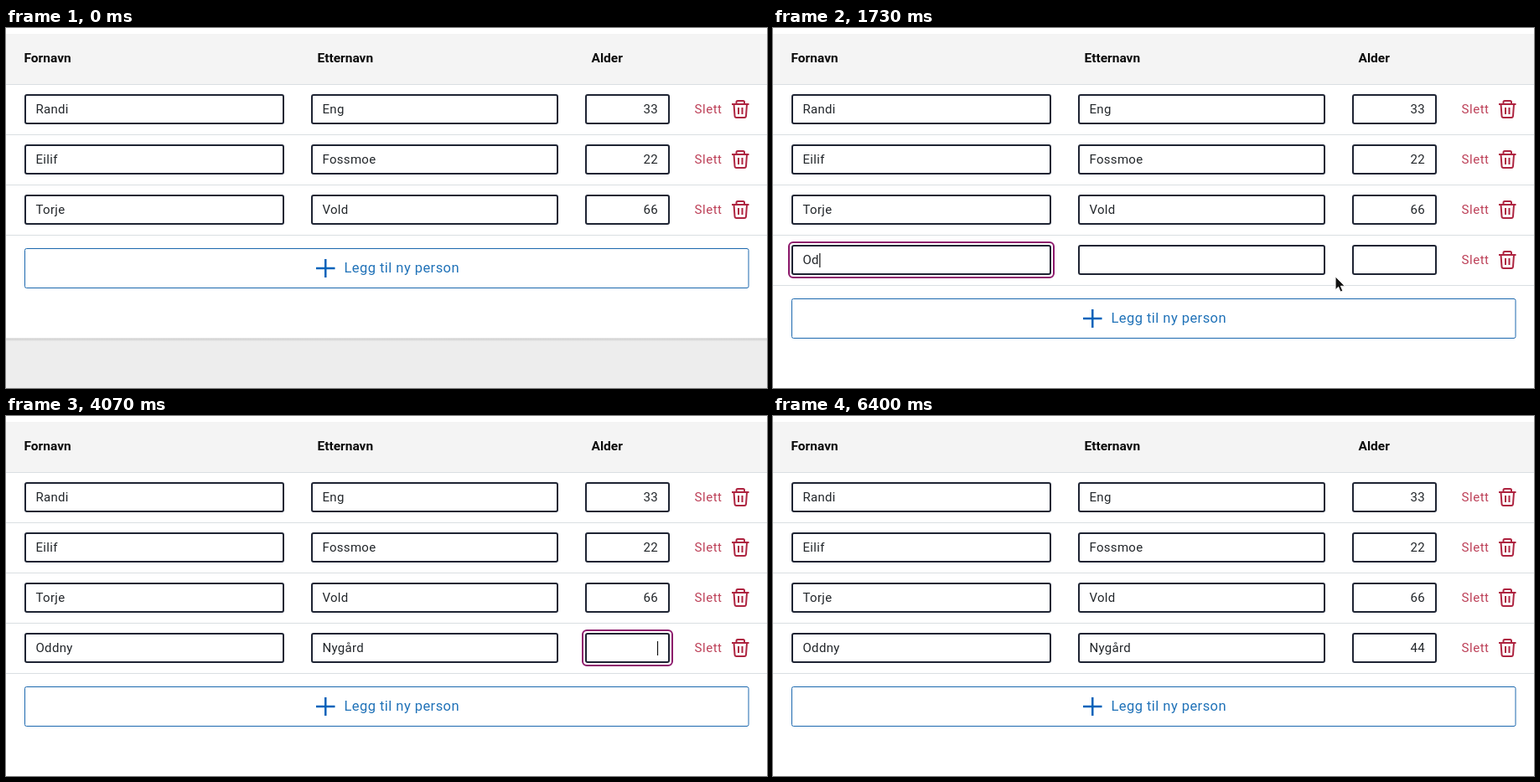
Recreate the animation shown at these times as an HTML page. Size 908 by 430 pixels, loop 6.79 s.

```html
<!DOCTYPE html>
<html lang="nb">
<head>
<meta charset="utf-8">
<title>Personliste</title>
<style>
  html, body { margin: 0; width: 100%; height: 100%; overflow: hidden; background: #fff; }
  svg { display: block; }
  text { font: 15px Roboto, "Open Sans", sans-serif; letter-spacing: .3px; fill: #22262a; white-space: pre; }
  .head text { font-size: 15.5px; font-weight: 700; letter-spacing: 0; fill: #0b0b0b; }
  .field { fill: #fff; stroke: #1e2433; stroke-width: 2; }
  .num { text-anchor: end; }
  .delete text { fill: #bd4058; letter-spacing: .55px; }
  .delete path { fill: none; stroke: #ae2440; stroke-width: 2; }
  .rule { stroke: #dadfe2; }
  #button rect { fill: #fff; stroke: #1c68ae; }
  #button path { stroke: #0062ba; stroke-width: 2.5; }
  #button text { font-size: 16.5px; letter-spacing: .45px; fill: #2072b8; }
  #button.hover rect { fill: #e4edf6; stroke: #1b5b97; }
  #button.hover path { stroke: #0b5299; }
  #button.hover text { fill: #1a5c9c; }
  #ring { fill: none; stroke: #8d1a6c; stroke-width: 2; }
  #caret { stroke: #111; stroke-width: 1.2; }
</style>
</head>
<body>
<svg width="908" height="430" viewBox="0 0 908 430">
  <defs>
    <linearGradient id="shade" x2="0" y2="1">
      <stop stop-color="#cbcbcb"/><stop offset="1" stop-color="#ededed"/>
    </linearGradient>
  </defs>
  <g class="head">
    <rect y="7" width="908" height="60" fill="#f4f4f4"/>
    <path class="rule" d="M0 67.5H908"/>
    <text x="21.5" y="41">Fornavn</text>
    <text x="371.5" y="41">Etternavn</text>
    <text x="698.5" y="41">Alder</text>
  </g>
  <g id="rows"></g>
  <rect id="ring" y="256" height="42" rx="5"/>
  <path id="caret"/>
  <g id="footer">
    <g id="button">
      <rect x="22.5" y="263.5" width="863.5" height="47" rx="2"/>
      <path d="M370 287H392.500M381.250 276V298"/>
      <text x="403.500" y="292">Legg til ny person</text>
    </g>
    <rect y="371" width="908" height="70" fill="#ededed"/>
    <rect y="370.5" width="908" height="4" fill="url(#shade)"/>
  </g>
  <g id="pointer">
    <path id="arrow" d="M0 0V15.500L3.500 12.200L6 18L8.600 16.900L6.200 11.200H11Z" fill="#111" stroke="#fff" stroke-width=".8"/>
    <path id="hand" d="M-1 0.500Q0-1 1.500 .5L2.500 5L7 5.500Q9.500 6 9 9L8 14H-1.500L-5 8.500Q-4.500 6.500-2 8L-.5 9Z" fill="#111" stroke="#fff" stroke-width=".8"/>
  </g>
</svg>
<script>
const LOOP = 6790, ROW_ADDED = 1200;
const NS = "http://www.w3.org/2000/svg";
const $ = id => document.getElementById(id);

const columns = [
  { x: 22, width: 310 },
  { x: 364, width: 295 },
  { x: 691, width: 101, num: true }
];
const people = [
  ["Randi", "Eng", "33"],
  ["Eilif", "Fossmoe", "22"],
  ["Torje", "Vold", "66"],
  ["", "", ""]
];

// Typing: column, focus and blur times, and the time of each key
const entries = [
  { text: "Oddny", focus: 1270, blur: 2470, keys: [1560, 1680, 1870, 2000, 2170] },
  { text: "Nygård", focus: 2470, blur: 3800, keys: [2730, 2900, 3060, 3220, 3400, 3560] },
  { text: "44", focus: 3800, blur: 5760, keys: [4380, 4600] }
];

// Pointer visits: [time, x, y]
const visits = [
  [[100, 891, 424], [330, 830, 372], [560, 722, 312], [760, 672, 297], [2980, 670, 297]],
  [[5000, 670, 297], [5120, 705, 330], [5330, 786, 377], [5670, 788, 388],
   [5860, 790, 390], [6150, 822, 401], [6400, 838, 405]]
];

function add(parent, tag, attrs, content = "") {
  const el = document.createElementNS(NS, tag);
  for (const key in attrs) el.setAttribute(key, attrs[key]);
  el.textContent = content;
  return parent.appendChild(el);
}

function addRow(values, index) {
  const row = add($("rows"), "g", { transform: `translate(0 ${index * 60})` });
  const cells = columns.map((col, i) => {
    add(row, "rect", { class: "field", x: col.x + 1, y: 80, width: col.width - 2, height: 34, rx: 2 });
    return add(row, "text", {
      class: col.num ? "num" : "", x: col.num ? 778 : col.x + 13.5, y: 102
    }, values[i]);
  });
  const del = add(row, "g", { class: "delete" });
  add(del, "text", { x: 821.5, y: 102 }, "Slett");
  add(del, "path", {
    d: "M866 91H886.500M871.500 91V88.500Q871.500 87 873 87H879.500Q881 87 881 88.500V91" +
       "M868.500 91L869.500 105Q869.700 107 871.500 107H881Q882.800 107 883 105L884 91M874 95V103M878.500 95V103"
  });
  add(row, "path", { class: "rule", d: "M0 127.5H908" });
  return { row, cells };
}

const newRow = people.map(addRow).pop();

function pointerAt(t) {
  const path = visits.find(v => t >= v[0][0] && t < v[v.length - 1][0]);
  if (!path) return null;
  const i = path.findIndex(p => p[0] > t);
  const [t0, x0, y0] = path[i - 1], [t1, x1, y1] = path[i];
  const k = (t - t0) / (t1 - t0);
  return { x: x0 + (x1 - x0) * k, y: y0 + (y1 - y0) * k };
}

const show = (el, visible) => el.setAttribute("visibility", visible ? "visible" : "hidden");

function drawEntry(t) {
  entries.forEach((entry, i) => {
    newRow.cells[i].textContent = entry.text.slice(0, entry.keys.filter(k => k <= t).length);
  });
  const active = entries.findIndex(e => t >= e.focus && t < e.blur);
  show($("ring"), active >= 0);
  show($("caret"), false);
  if (active < 0) return;

  const col = columns[active], entry = entries[active];
  $("ring").setAttribute("x", col.x - 3);
  $("ring").setAttribute("width", col.width + 6);
  const lastInput = Math.max(entry.focus, ...entry.keys.filter(k => k <= t));
  const typed = newRow.cells[active];
  const length = typed.textContent ? typed.getComputedTextLength() : 0;
  const x = col.num ? 777.5 : col.x + 14.5 + length;
  $("caret").setAttribute("d", `M${x} 269V286`);
  show($("caret"), (t - lastInput) % 1000 < 500);
}

function draw(t) {
  const added = t >= ROW_ADDED;
  const shift = added ? 60 : 0;
  newRow.row.style.display = added ? "" : "none";
  $("footer").setAttribute("transform", `translate(0 ${shift})`);
  drawEntry(t);

  const p = pointerAt(t);
  const hover = !!p && p.x > 22 && p.x < 886 && p.y > 263 + shift && p.y < 311 + shift;
  $("button").setAttribute("class", hover ? "hover" : "");
  show($("arrow"), p && !hover);
  show($("hand"), hover);
  if (p) $("pointer").setAttribute("transform", `translate(${p.x} ${p.y})`);
}

const start = performance.now();
function tick() {
  draw((performance.now() - start) % LOOP);
  requestAnimationFrame(tick);
}
tick();
</script>
</body>
</html>
```
